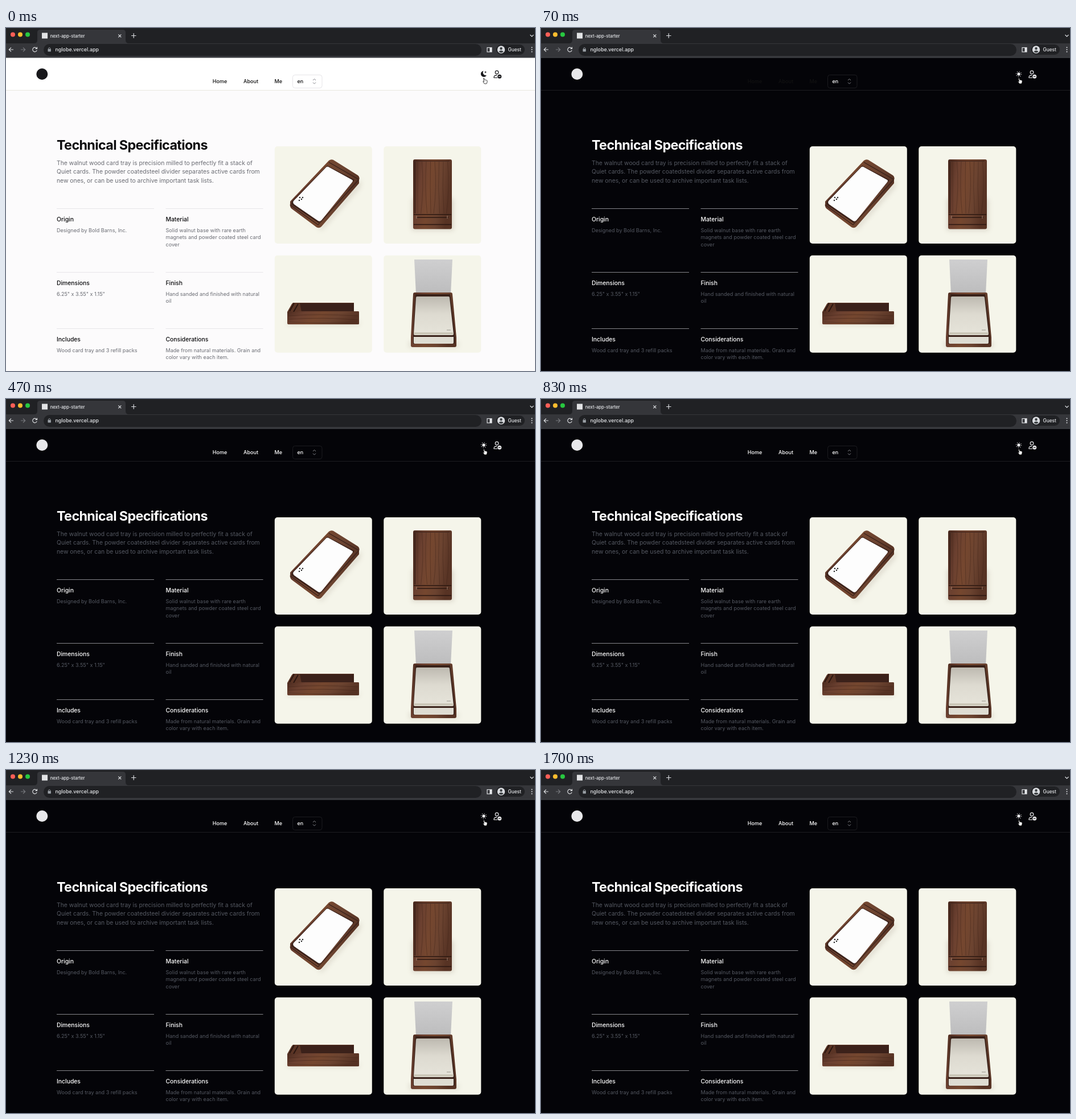
Animation, 929 px wide and 603 px high, one loop 1730 ms. Source, as an HTML page:

```html
<!DOCTYPE html>
<html lang="en">
<head>
<meta charset="utf-8">
<title>next-app-starter</title>
<style>
  html, body { margin: 0; width: 100%; height: 100%; overflow: hidden; }
  svg { display: block; font-family: Inter, "Liberation Sans", sans-serif; }
  #stage {
    --page: #fcfbfc; --header: #fff; --edge: #e9e7df; --rule: #e7e5e9;
    --ink: #0b0b0d; --body: #6a6c73; --box: #e6e5e8; --icon: #18181b;
  }
  #stage.dark {
    --page: #040408; --header: #040408; --edge: #1d1d21; --rule: #85858a;
    --ink: #fff; --body: #555962; --box: #1b1b1f; --icon: #e8e8ea;
  }
  .sun, .dark .moon { display: none; }
  .dark .sun { display: inline; }
  .ink { fill: var(--ink); }
  .icon { fill: var(--icon); }
  .line { fill: none; stroke: var(--icon); }
  .rule { stroke: var(--rule); stroke-width: 1.2; }
  .title { font-size: 23.33px; font-weight: 700; letter-spacing: -.027em; }
  .lead { font-size: 10.37px; fill: var(--body); }
  .term { font-size: 10.37px; font-weight: 500; }
  .detail { font-size: 9.07px; fill: var(--body); }
  .nav { font-size: 9.07px; font-weight: 500; }
  .chrome { fill: #e8eaed; font-weight: 500; }
  .stroke { fill: none; stroke: #dcdee1; stroke-width: 1.2; }
</style>
</head>
<body>
<svg id="stage" width="929" height="603" viewBox="0 0 929 603">
  <defs>
    <linearGradient id="wood" x2="1" y2=".25">
      <stop stop-color="#4b2a1e"/><stop offset=".25" stop-color="#6b4030"/>
      <stop offset=".5" stop-color="#75472f"/><stop offset=".75" stop-color="#6b4330"/>
      <stop offset="1" stop-color="#573324"/>
    </linearGradient>
    <linearGradient id="steel" y2="1" x2="0">
      <stop stop-color="#cfcfd0"/><stop offset="1" stop-color="#bcbcbd"/>
    </linearGradient>
    <linearGradient id="cards" y2="1" x2="0">
      <stop stop-color="#bdb9b0"/><stop offset=".45" stop-color="#dddad0"/><stop offset="1" stop-color="#e6e4da"/>
    </linearGradient>
    <filter id="blur" x="-30%" y="-30%" width="160%" height="160%"><feGaussianBlur stdDeviation="4"/></filter>
  </defs>

  <!-- Page -->
  <rect y="52" width="929" height="551" fill="var(--page)"/>
  <rect y="52" width="929" height="57" fill="var(--header)"/>
  <rect y="109" width="929" height="1" fill="var(--edge)"/>
  <circle class="icon" cx="63.3" cy="81" r="10"/>
  <g id="nav" class="nav">
    <text x="362.7" y="97">Home</text><text x="417" y="97">About</text><text x="471.5" y="97">Me</text>
  </g>
  <rect x="503.5" y="82.5" width="51.5" height="23" rx="4" fill="var(--header)" stroke="var(--box)"/>
  <text class="nav ink" x="511.5" y="97">en</text>
  <path d="M539 92l2.5-2.6 2.5 2.6M539 95.6l2.5 2.6 2.5-2.6" fill="none" stroke="#85868c"/>

  <path class="icon moon" d="M838.5 75.5a5.3 5.3 0 1 0 5.4 7.6a5 5 0 0 1-5.4-7.6zM842 75.5l.6 1.5 1.5.6-1.5.6-.6 1.5-.6-1.5-1.5-.6 1.5-.6z"/>
  <g class="sun">
    <circle class="icon" cx="839" cy="81" r="2.7"/>
    <circle class="line" cx="839" cy="81" r="4.6" stroke-width="1.1" stroke-dasharray="1.1 2.513"/>
  </g>
  <g class="line" stroke-width="1.2">
    <circle cx="862" cy="78" r="2.8"/>
    <path d="M863 87.5h-6v-1.5q.5-2.8 5-2.8"/>
  </g>
  <circle class="icon" cx="866.7" cy="85.2" r="3.5"/>
  <path d="M864.8 85.2h3.8" stroke="var(--header)"/>
  <path d="M838.4 88.5q1.2-1 1.7.5l.8 2.4q1-.8 1.5.2q1-.5 1.5.4q1.2-.2 1.2 1.2l-.3 2.6-1 2.2h-3.6l-2.3-3.3q-.6-1.3.8-1l.8.7z" fill="#fff" stroke="#111" stroke-width=".8"/>

  <text class="title ink" x="89" y="214">Technical Specifications</text>
  <g id="copy"></g>

  <!-- Pictures -->
  <g fill="#f5f5ea">
    <rect x="471.8" y="208" width="171" height="171" rx="5"/><rect x="663.3" y="208" width="171" height="171" rx="5"/>
    <rect x="471.8" y="399.7" width="171" height="171" rx="5"/><rect x="663.3" y="399.7" width="171" height="171" rx="5"/>
  </g>
  <g fill="#8f8070" opacity=".25" filter="url(#blur)">
    <path d="M503 318l47 34 74-86-2 14-68 76z"/>
    <path d="M713 300h73v56h-73z"/>
    <path d="M495 515h125v7h-125z"/>
    <path d="M708 552h86v9h-86z"/>
  </g>

  <path d="M567 233q4-3 8-1l43 27q4 3 2 8v6l-66 76q-4 4-9 1l-43-32q-4-3-3-9v-4z" fill="url(#wood)"/>
  <path d="M564 242l48 25-63 76-48-33 1-5z" fill="#3a2119"/>
  <path d="M562 245q2-2 4-1l42 23q2 1 0 4l-54 67q-3 3-6 1l-42-29q-3-3-1-6z" fill="#fdfdfd"/>
  <path d="M567 236l52 30M499 311l49 35 71-79" fill="none" stroke="#37201a" stroke-width="1.2"/>
  <g fill="#222"><circle cx="516" cy="298" r="1.2"/><circle cx="521" cy="298" r="1.2"/><circle cx="515" cy="303" r="1.2"/><circle cx="519" cy="301" r="1.2"/></g>

  <rect x="715" y="231" width="68" height="122.5" rx="3" fill="url(#wood)"/>
  <path d="M716 233h4v93h-4zM719 233h60v2h-60z" fill="#3d2219" opacity=".6"/>
  <g id="grain" fill="none" stroke="#3f2419" stroke-width="1" opacity=".45"></g>
  <path d="M716 328h66M721 333h56M716 345.5h66" stroke="#2b1711" stroke-width="1.5"/>
  <path d="M721 330v5M775 330v5" stroke="#a38370"/>

  <path d="M494 499l8-14 2-2h107v17h-90l-6 2z" fill="#5a3425"/>
  <path d="M516 484h95v15h-92z" fill="#3b211a"/>
  <path d="M498 498l8-14M505 499l8-14" stroke="#2a1610" stroke-width="2"/>
  <path d="M494 499h18l1-1h106q1 0 1 2v20q0 1-2 1H497q-3 0-3-2z" fill="url(#wood)"/>
  <path d="M496 506q50-4 122 0M496 512q60-4 122 1M497 517q60 3 120 0" fill="none" stroke="#422519" opacity=".5"/>

  <path d="M717 407h67l-3 61h-61z" fill="url(#steel)"/>
  <path d="M718 465h63q3 0 3 3l7 76v14q0 3-3 3h-74q-3 0-3-3v-14l4-76q0-3 3-3z" fill="url(#wood)"/>
  <path d="M719 468h61l8 73v14h-73v-14z" fill="#382119"/>
  <path d="M720 474q0-2 2-2h55q2 0 2 2l7 64q0 2-2 2h-66q-2 0-2-2z" fill="url(#cards)"/>
  <path d="M716 535h70v4h-70z" fill="#cbc7b8"/>
  <path d="M716 543h70v10q0 2-2 2h-66q-2 0-2-2z" fill="#dedcd2"/>
  <path d="M774 531h7" stroke="#99968c"/>

  <!-- Browser -->
  <rect width="929" height="52" fill="#202124"/>
  <path d="M0 27h49q6 0 6-6V8q0-5 5-5h145q5 0 5 5v13q0 6 6 6h713v25H0z" fill="#35363a"/>
  <rect y="51.5" width="929" height="1" fill="#4a4c50"/>
  <rect x="66" y="28" width="769" height="21" rx="10.5" fill="#202124"/>
  <rect x="861" y="29" width="50" height="18" rx="9" fill="#202124"/>
  <circle cx="12" cy="11.5" r="4" fill="#fe5f57"/><circle cx="25" cy="11.5" r="4" fill="#febc2e"/><circle cx="38" cy="11.5" r="4" fill="#28c840"/>
  <rect x="63" y="8.5" width="10" height="10" fill="#e2e3e5"/>
  <text class="chrome" x="77.7" y="16.5" font-size="7.65">next-app-starter</text>
  <text class="chrome" x="86.5" y="41.3" font-size="8.9">nglobe.vercel.app</text>
  <text class="chrome" x="881.5" y="41.3" font-size="8.3">Guest</text>
  <g class="stroke">
    <path d="M197.3 11.3l5 5m0-5l-5 5M220 13.5h8.5M224.2 9.3v8.5M920.5 12l3 3 3-3"/>
    <path d="M13 38H5.5m3.5-3.7L5.3 38l3.7 3.7"/>
    <path d="M26 38h7.5m-3.5-3.7l3.7 3.7-3.7 3.7" stroke="#77797d"/>
    <path d="M53.7 35.8a3.8 3.8 0 1 0 .5 3.3M54.5 33.5v3h-3"/>
    <path d="M74.5 37v-1.3q1.7-2.6 3.4 0V37" stroke="#9aa0a6" stroke-width="1"/>
    <rect x="845" y="34.5" width="8" height="7.5"/>
  </g>
  <rect x="73.5" y="37" width="5.4" height="4.5" rx=".6" fill="#9aa0a6"/>
  <path d="M849.5 34.5h3.5v7.5h-3.5z" fill="#e8eaed"/>
  <circle cx="869.5" cy="38" r="6.7" fill="#dadce0"/>
  <circle cx="869.5" cy="36" r="2.2" fill="#3c4043"/><path d="M865.3 41.5q4.2-4 8.4 0q-4.2 4-8.4 0z" fill="#3c4043"/>
  <g fill="#dcdee1"><circle cx="923.5" cy="34.2" r="1"/><circle cx="923.5" cy="38" r="1"/><circle cx="923.5" cy="41.8" r="1"/></g>
</svg>
<script>
  const $ = id => document.getElementById(id);
  const text = (kind, x, y, s) => `<text class="${kind}" x="${x}" y="${y}">${s}</text>`;
  const lines = (kind, x, y, step, list) => list.map((s, i) => text(kind, x, y + i * step, s)).join('');
  const spec = (x, y, name, ...list) =>
    `<path class="rule" d="M${x} ${y + .5}h171"/>` +
    text('term ink', x, y + 22.5, name) + lines('detail', x, y + 41.5, 12.96, list);

  $('copy').innerHTML = lines('lead', 89, 240.5, 15.55, [
    'The walnut wood card tray is precision milled to perfectly fit a stack of',
    'Quiet cards. The powder coatedsteel divider separates active cards from',
    'new ones, or can be used to archive important task lists.'
  ]) +
    spec(89, 317, 'Origin', 'Designed by Bold Barns, Inc.') +
    spec(280.5, 317, 'Material', 'Solid walnut base with rare earth', 'magnets and powder coated steel card', 'cover') +
    spec(89, 429, 'Dimensions', '6.25" x 3.55" x 1.15"') +
    spec(280.5, 429, 'Finish', 'Hand sanded and finished with natural', 'oil') +
    spec(89, 528, 'Includes', 'Wood card tray and 3 refill packs') +
    spec(280.5, 528, 'Considerations', 'Made from natural materials. Grain and', 'color vary with each item.');

  $('grain').innerHTML = Array.from({ length: 8 }, (_, i) => {
    const x = 723 + i * 7.5, bend = 4 * Math.sin(i * 2);
    return `<path d="M${x} 235q${bend} 45 ${-bend / 2} 91"/>`;
  }).join('');

  // The theme flips at once; the links start dark and fade to white.
  const LOOP = 1730, SWITCH = 66, FADE = 150, DARK = 17;
  function draw() {
    const t = performance.now() % LOOP;
    const p = Math.min(1, Math.max(0, (t - SWITCH) / FADE));
    const v = Math.round(DARK + (255 - DARK) * p * p * (3 - 2 * p));
    $('stage').classList.toggle('dark', t >= SWITCH);
    $('nav').setAttribute('fill', `rgb(${v},${v},${v})`);
    requestAnimationFrame(draw);
  }
  draw();
</script>
</body>
</html>
```
